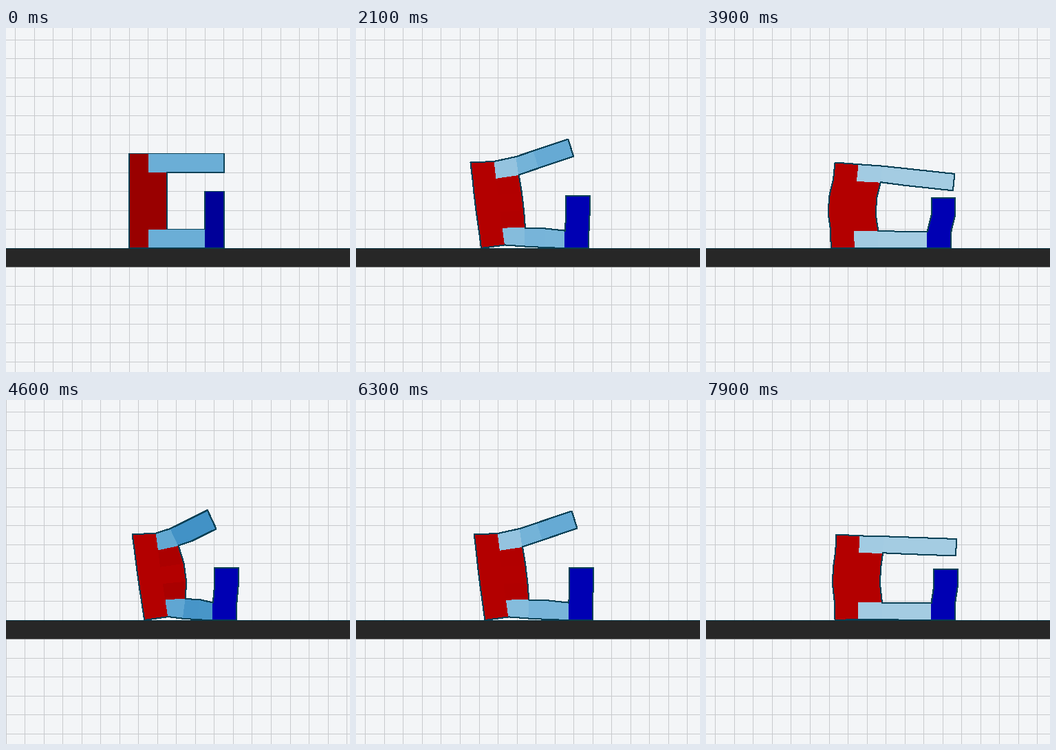
Recreate the animation shown at these times as a matplotlib script. Size 500 by 500 pixels, loop 8000 ms.

```python
import numpy as np
import matplotlib.pyplot as plt
from matplotlib.animation import FuncAnimation
from matplotlib.collections import PolyCollection
from matplotlib.patches import Polygon, Rectangle

SIZE, FRAMES, STEP = 500, 80, 100
CELL, FLOOR, PX = 27.53, 320, 0.72
PERIOD, STRIDE = 1400, 10.95
WIDE = 34.5                      # swollen red and blue cells
SECTIONS = np.cumsum([6, 6, 4, 4, 3, 1, 2, 4])

# Key points of the gait: phase in ms, beam cell width, sideways lean of the back.
PHASE, WIDTH, LEAN = zip((300, 20, -6), (400, 20, -17.5), (500, 21.5, -20.5),
                         (700, 26.5, -15.5), (800, 31, -11), (900, 35, 2),
                         (1000, 35, 8.5), (1300, 35, 1))


def pts(x, y):
    return np.column_stack(np.broadcast_arrays(x, y)).astype(float)


def line(p, q, n):
    return np.linspace(p, q, n)


def scroll(ms):
    """The view eases one cell to the right."""
    return CELL / (1 + np.exp((4600 - ms) / 72))


def center(ms):
    sway = np.cos(2 * np.pi * (ms - 450) / PERIOD)
    return 242 + 4 * sway + STRIDE * ms / PERIOD


def rest_body():
    """Edges of the relaxed body on the square grid, bottom row first."""
    def edge(cols, rows):
        return pts(179.3 + CELL * np.array(cols), FLOOR - 27.5 * np.array(rows))
    up = np.arange(6)
    return np.vstack([edge(0, up), edge(1, up), edge(2, up[1:5]),
                      edge(up[2:], 5), edge(up[3:], 4), edge([3], 1),
                      edge([2, 3], 0), edge(4, up[:4]), edge(5, up[:4])])


def walking_body(ms):
    w = np.interp(ms, PHASE, WIDTH, period=PERIOD)
    lean = np.interp(ms, PHASE, LEAN, period=PERIOD)
    q = (35 - w) / 15            # contraction of the beams
    bulge = 3.5 * np.exp(lean / 9.5)
    root = 35 - 13 * q ** 3      # beam cell next to the back
    span = 2 * WIDE + root + 2 * w + 3 * q
    foot = center(ms) - span / 2

    # Back: two stacked columns.
    t = np.linspace(0, 1, 6)
    a = pts(foot + lean * t - 1.1 * bulge * np.sin(np.pi * t) ** 3,
            FLOOR - 124.5 * t)
    b = a + pts(WIDE, 0.2 * lean + 3 * t - 1.5)
    b[:, 1] = np.minimum(b[:, 1], FLOOR)
    s = np.linspace(0, 1, 4)
    pinch = 5.5 * q ** 2 * (2 * s - 1) ** 2
    c = b[1:5] + pts(WIDE - pinch, 0.28 * lean * s - 1.5 * q ** 2)

    # Upper beam: a chain of cells with constant thickness.
    tilt = 2.1 * lean / 124 - np.radians(8) * q ** 2
    turn = tilt * np.array([0.7, 1.06, 1.06, 1.06])
    length = np.array([root, w, w, w])
    top = b[5] + np.cumsum(pts(length * np.cos(turn), length * np.sin(turn)), axis=0)
    thick = 24.5 + 5.5 * q ** 2
    under = top[1:] + [-thick * np.sin(tilt), thick * np.cos(tilt)]

    # Front leg and lower beam.
    bend = np.clip((s - 0.25) / 0.4, 0, 1)
    bend = bend * bend * (3 - 2 * bend)
    d = pts(foot + span - WIDE + (bulge + 2 * q ** 2) * bend,
            FLOOR - (76.5 - 0.55 * bulge) * s)
    e = d + [WIDE, 0]
    sill = line(c[0], d[1], 3)[1:2] - [0, 2 * q]
    sole = line(b[0], d[0], 4)[1:3] + [0, q]
    return np.vstack([a, b, c, top, under, sill, sole, d, e])


REST = rest_body()


def body_at(ms):
    k = min(ms / 300, 1)
    body = REST * (1 - k) + walking_body(ms) * k
    return body - [scroll(ms), 0]


def strip(low, high):
    return [(low[i], low[i + 1], high[i + 1], high[i]) for i in range(len(low) - 1)]


def column(left, right):
    return [(left[i], right[i], right[i + 1], left[i + 1])
            for i in range(len(left) - 1)]


BLUES = [(66, 146, 198), (107, 174, 214), (164, 204, 226)]


def tint(quad, kind):
    """Colour by how wide a cell is stretched."""
    bl, br, tr, tl = quad
    w = (np.hypot(*(br - bl)) + np.hypot(*(tr - tl))) / 2
    if kind == "beam":
        return [np.interp(w, [20, 27.5, 35], ch) / 255 for ch in zip(*BLUES)]
    v = np.interp(w, [27.6, 34], [153, 179]) / 255
    return (v, 0, 0) if kind == "red" else (0, 0, v)


fig = plt.figure(figsize=(5, 5), dpi=100, facecolor="#f3f5f7")
ax = fig.add_axes([0, 0, 1, 1])
ax.set_xlim(0, SIZE)
ax.set_ylim(SIZE, 0)
ax.axis("off")


def rule(xs, ys, color, z):
    return ax.plot(xs, ys, color=color, lw=PX, snap=False, zorder=z)[0]


posts = []
for i in range(19):
    y = int(17.4 + CELL * i) + 0.5
    rule([0, SIZE], [y, y], "#c8cacd", 1)
    posts.append(rule([0, 0], [0, SIZE], "#c8cacd", 1))

cells = PolyCollection([], linewidths=0, antialiased=False, zorder=2)
ax.add_collection(cells)
outline = Polygon([(0, 0), (1, 1)], fill=False, ec="#0b4156", lw=PX,
                  antialiased=False, snap=False, zorder=3)
ax.add_patch(outline)
ax.add_patch(Rectangle((0, FLOOR), SIZE, 27.5, fc="#272727", lw=0, snap=False,
                       zorder=4))
rule([0, SIZE], [FLOOR + 0.5] * 2, "#0b3644", 5)


def draw(frame):
    ms = frame * STEP
    for i, post in enumerate(posts):
        x = np.floor(13.85 + CELL * i - scroll(ms) % CELL) + 0.5
        post.set_xdata([x, x])

    a, b, c, t, u, h, f, d, e = np.split(body_at(ms), SECTIONS)
    groups = [
        ("red", column(a, b) + column(b[1:5], c)),
        ("beam", strip([b[4], c[3], *u], [b[5], *t])
         + strip([b[0], *f, d[0]], [b[1], c[0], h[0], d[1]])),
        ("blue", column(d, e)),
    ]
    quads = [(q, kind) for kind, qs in groups for q in qs]
    cells.set_verts([np.array(q) for q, _ in quads])
    cells.set_facecolor([tint(q, kind) for q, kind in quads])
    outline.set_xy(np.vstack([a, b[5:], t, u[::-1], c[::-1], h, d[1:],
                              e[::-1], d[:1], f[::-1], b[:1]]))
    return cells, outline, *posts


anim = FuncAnimation(fig, draw, frames=FRAMES, interval=STEP, repeat=True,
                     repeat_delay=0)
plt.show()
```
